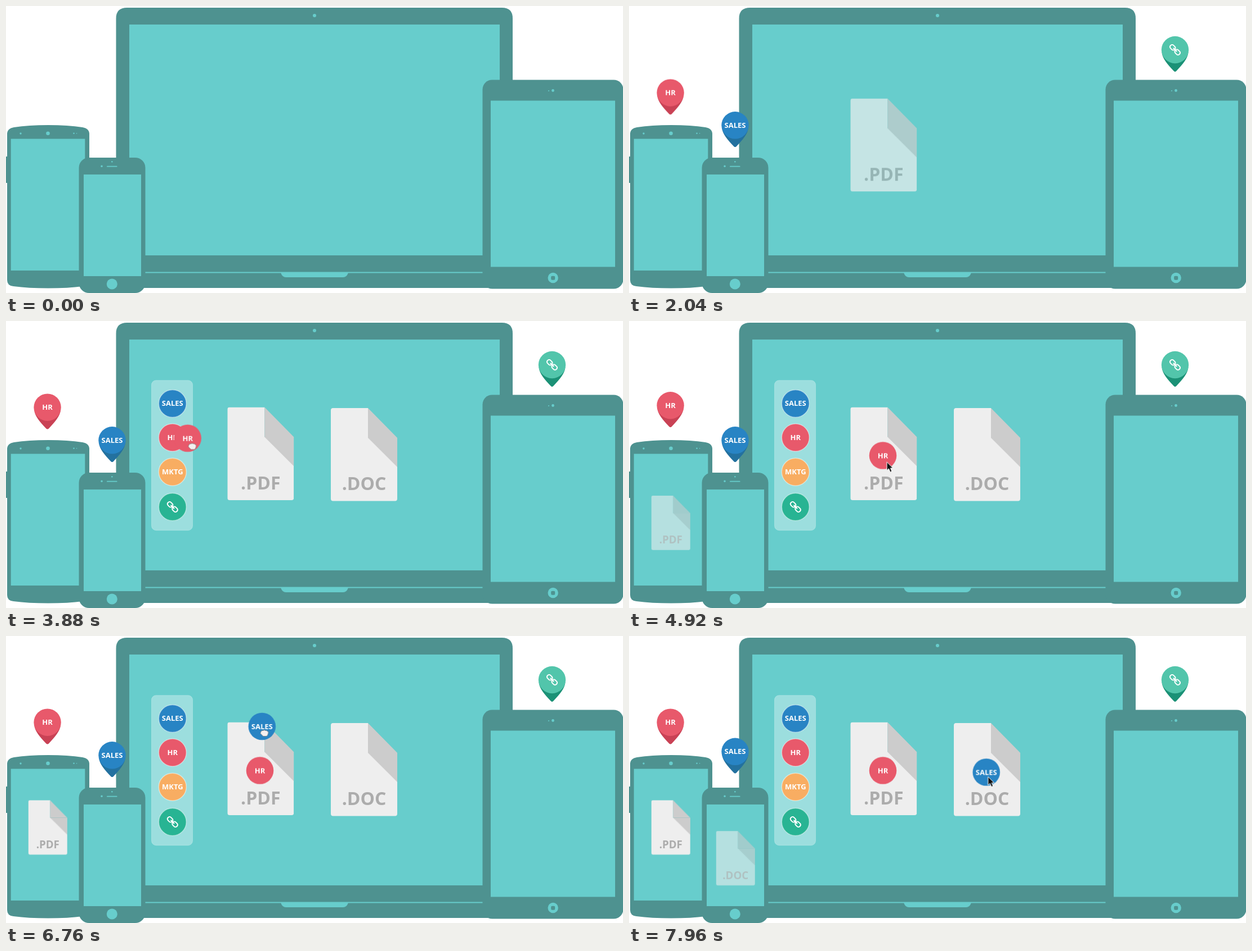
These frames come from a looping animation (1096x511 px, 8000 ms). An HTML page:

```html
<!DOCTYPE html>
<html lang="en">
<head>
<meta charset="utf-8">
<title>Sharing files to devices</title>
<style>
html, body { margin: 0; width: 100%; height: 100%; overflow: hidden; background: #fff; }
svg { display: block; width: 100vw; height: 100vh; }
text { font: bold 13px "Open Sans", sans-serif; fill: #fff; text-anchor: middle; }
.ext { font-size: 32px; fill: #acacac; }
.lit { fill: #67cdcc; }
.dark { fill: #4e9290; }
.ring circle { stroke: rgba(255,255,255,.45); stroke-width: 1.5; }

/* One shared 8 s clock: 1% = 80 ms */
.a { animation: 8s linear infinite; }

.pin-hr { animation-name: pin-hr; }
.pin-sales { animation-name: pin-sales; }
.pin-link { animation-name: pin-link; }
@keyframes pin-hr {
  0%, 2% { opacity: 0; transform: translateY(8px); }
  5% { opacity: 1; transform: translateY(-6px); }
  8% { transform: translateY(1.5px); }
  11%, 20% { transform: translateY(0); }
  25.5% { transform: translateY(.7px); }
  32.5% { transform: translateY(1.7px); }
  43%, 60.25% { transform: translateY(0); animation-timing-function: ease-in-out; }
  63% { transform: translateY(-8px); animation-timing-function: ease-in-out; }
  65.5%, 100% { opacity: 1; transform: translateY(0); }
}
@keyframes pin-sales {
  0%, 4.5% { opacity: 0; transform: translateY(8px); }
  7.5% { opacity: 1; transform: translateY(-6px); }
  10.5% { transform: translateY(1.5px); }
  13%, 97.5% { transform: translateY(0); }
  99.5% { transform: translateY(-6.5px); }
  100% { opacity: 1; transform: translateY(-7.5px); }
}
@keyframes pin-link {
  0%, 8% { opacity: 0; transform: translateY(8px); }
  11% { opacity: 1; transform: translateY(-6px); }
  14% { transform: translateY(1.5px); }
  17%, 100% { opacity: 1; transform: translateY(0); }
}

.pdf { animation-name: pdf; }
.doc { animation-name: doc; }
@keyframes pdf {
  0%, 20.75% { opacity: 0; transform: translateY(38px); }
  27.5%, 100% { opacity: 1; transform: translateY(0); }
}
@keyframes doc {
  0%, 26% { opacity: 0; transform: translateY(36px); }
  32% { opacity: 1; }
  33%, 100% { opacity: 1; transform: translateY(0); }
}

/* Phone files rise as a whole but fade piece by piece */
.rise1 { animation-name: rise1; }
.rise2 { animation-name: rise2; }
.fade1 > * { animation: fade1 8s linear infinite; }
.fade2 > * { animation: fade2 8s linear infinite; }
@keyframes rise1 {
  0%, 60% { transform: translateY(23.5px); }
  65% { transform: translateY(7px); animation-timing-function: ease-out; }
  68%, 100% { transform: translateY(0); }
}
@keyframes rise2 {
  0%, 97.5% { transform: translateY(23px); }
  100% { transform: translateY(17.4px); }
}
@keyframes fade1 {
  0%, 60% { opacity: 0; }
  61.5% { opacity: .58; }
  63.5%, 100% { opacity: 1; }
}
@keyframes fade2 {
  0%, 97.5% { opacity: 0; }
  99.5% { opacity: .58; }
  100% { opacity: .7; }
}

.panel { animation-name: panel; }
@keyframes panel {
  0%, 33.5% { opacity: 0; }
  42%, 100% { opacity: 1; }
}

/* Drags: x and y run on separate curves, giving a bent path */
.hr-x { animation-name: hr-x; }
.hr-y { animation-name: hr-y; }
.hr-soft { animation-name: hr-soft; }
.hr-hand { animation-name: hr-hand; }
.hr-arrow { animation-name: hr-arrow; }
.sales-x { animation-name: sales-x; }
.sales-y { animation-name: sales-y; }
.sales-soft { animation-name: sales-soft; }
.sales-hand { animation-name: sales-hand; }
.sales-arrow { animation-name: sales-arrow; }
@keyframes hr-x {
  0%, 45.5% { transform: translateX(-155px); animation-timing-function: cubic-bezier(.37,0,.63,1); }
  56.5%, 100% { transform: translateX(0); }
}
@keyframes hr-y {
  0% { visibility: hidden; transform: translateY(-32px); }
  45.4% { visibility: hidden; }
  45.5% { visibility: visible; transform: translateY(-32px); animation-timing-function: cubic-bezier(.9,0,.7,1); }
  56.5%, 100% { visibility: visible; transform: translateY(0); }
}
@keyframes hr-soft {
  0%, 56.4% { filter: blur(.7px); }
  56.5%, 100% { filter: none; }
}
@keyframes hr-hand {
  0%, 56.5% { opacity: 1; }
  56.51%, 100% { opacity: 0; }
}
@keyframes hr-arrow {
  0%, 56.5% { opacity: 0; transform: none; }
  56.51% { opacity: 1; }
  66% { transform: none; animation-timing-function: ease-in-out; }
  74%, 75.4% { opacity: 1; transform: translate(-158px,-93px); }
  75.5%, 100% { opacity: 0; transform: translate(-158px,-93px); }
}
@keyframes sales-x {
  0%, 75.5% { transform: translateX(-339px); animation-timing-function: cubic-bezier(.37,0,.63,1); }
  94.25%, 100% { transform: translateX(0); }
}
@keyframes sales-y {
  0% { visibility: hidden; transform: translateY(-95.5px); }
  75.4% { visibility: hidden; }
  75.5% { visibility: visible; transform: translateY(-95.5px); animation-timing-function: cubic-bezier(.9,0,.7,1); }
  94.25%, 100% { visibility: visible; transform: translateY(0); }
}
@keyframes sales-soft {
  0%, 94.2% { filter: blur(.7px); }
  94.25%, 100% { filter: none; }
}
@keyframes sales-hand {
  0%, 94.25% { opacity: 1; }
  94.26%, 100% { opacity: 0; }
}
@keyframes sales-arrow {
  0%, 94.25% { opacity: 0; }
  94.26%, 100% { opacity: 1; }
}
</style>
</head>
<body>
<svg viewBox="0 0 1096 511" preserveAspectRatio="none">
<defs>
  <path id="tail" d="M-23.4 5C-22.5 16-13 26-3 37Q0 41 3 37C13 26 22.5 16 23.4 5Z"/>
  <g id="link" transform="rotate(45)" fill="none" stroke="#fff" stroke-width="2">
    <rect x="-11" y="-3.7" width="10" height="7.4" rx="3.2"/>
    <rect x="1" y="-3.7" width="10" height="7.4" rx="3.2"/>
    <path d="M-4.5 0H4.5"/>
  </g>
  <path id="sheet" fill="#eee" d="M4 0H66V53H118V161.500Q118 165.500 114 165.500H4Q0 165.500 0 161.500V4Q0 0 4 0Z"/>
  <path id="fold" fill="#ccc" d="M66 0V53H118Z"/>
  <path id="shade" fill="#000" fill-opacity=".143" d="M66 53H118V105Z"/>
  <g id="paper"><use href="#sheet"/><path fill="#ccc" d="M66 0L118 53V105L66 53Z"/></g>
  <path id="arrow" fill="#111" stroke="#fff" stroke-width="1" stroke-linejoin="round" d="M0 0V15L3.500 12L6 18L9 16.800L6.500 11H11Z"/>
  <path id="hand" fill="#f4f0f0" stroke="#777" stroke-width=".8" d="M-6-2Q-4-5-2-4Q0-6 2-4Q4-5 5-3Q8-3 7 1Q6 5 4 6H-2Q-5 3-7 1Z"/>
</defs>

<!-- laptop -->
<path class="dark" d="M195.500 502V22Q195.500 3 215 3H881Q900 3 900 22V502Z"/>
<path class="lit" d="M219 33H877V444H219ZM247 473.500H847V475.500H247ZM488 475H608Q605 483 599 483H497Q491 483 488 475Z"/>
<circle class="lit" cx="548" cy="17" r="3"/>

<!-- tablet -->
<rect class="dark" x="846.500" y="131.500" width="250" height="372" rx="17"/>
<rect class="lit" x="861" y="168.500" width="221" height="296"/>
<g class="lit">
  <circle cx="971.500" cy="150.500" r="2.400"/>
  <circle cx="964" cy="151" r="1"/>
  <circle cx="971.700" cy="484" r="9.200"/>
</g>
<rect class="dark" x="968.200" y="480.700" width="7" height="7" rx="1.800"/>

<!-- large phone -->
<path class="dark" d="M2 228Q2 218 14 216Q40 212 75 212Q110 212 136 216Q148 218 148 228V488Q148 498 137 499Q110 502.500 75 502.500Q40 502.500 13 499Q2 498 2 488Z"/>
<rect class="dark" x="0" y="268" width="3" height="47"/>
<rect class="lit" x="8.700" y="236.500" width="131.600" height="234.500"/>
<g class="lit">
  <circle cx="74.500" cy="226.700" r="3.300"/>
  <circle cx="26" cy="227" r="1.700"/>
  <circle cx="120.500" cy="226.700" r="1.300"/>
  <circle cx="125.500" cy="226.700" r=".8"/>
</g>

<!-- small phone -->
<rect class="dark" x="129.500" y="270" width="118" height="241" rx="18"/>
<g class="lit">
  <rect x="138" y="300" width="102" height="181"/>
  <rect x="179" y="284.800" width="18.500" height="1.800" rx=".9"/>
  <circle cx="188.300" cy="277.300" r="1.300"/>
  <circle cx="170" cy="285.300" r="1.700"/>
  <circle cx="188.300" cy="495" r="9.500"/>
</g>

<!-- pins -->
<g transform="translate(73.600 153.700)"><g class="a pin-hr">
  <use href="#tail" fill="#c94255"/><circle r="24.200" fill="#e8596b"/><text y="4.700">HR</text>
</g></g>
<g transform="translate(188.500 212.300)"><g class="a pin-sales">
  <use href="#tail" fill="#23719f"/><circle r="24.200" fill="#2884c4"/><text y="4.700">SALES</text>
</g></g>
<g transform="translate(970 78)"><g class="a pin-link">
  <use href="#tail" fill="#1b9176"/><circle r="24.200" fill="#52c5ab"/><use href="#link"/>
</g></g>

<!-- laptop files -->
<g transform="translate(393.300 153.500)"><g class="a pdf">
  <use href="#paper"/><text class="ext" x="59" y="146.300">.PDF</text>
</g></g>
<g transform="translate(577 155)"><g class="a doc">
  <use href="#paper"/><text class="ext" x="59" y="146.300">.DOC</text>
</g></g>

<!-- phone files -->
<g class="a rise1"><g class="fade1" transform="translate(39.800 292.500) scale(.584)">
  <use href="#sheet"/><use href="#fold"/><use href="#shade"/><text class="ext" x="59" y="146.300">.PDF</text>
</g></g>
<g class="a rise2"><g class="fade2" transform="translate(154.800 328.800) scale(.584)">
  <use href="#sheet"/><use href="#fold"/><use href="#shade"/><text class="ext" x="59" y="146.300">.DOC</text>
</g></g>

<!-- tag panel -->
<g class="a panel">
  <rect x="258.500" y="105.700" width="73" height="267" rx="8" fill="#fff" fill-opacity=".35" stroke="#fff" stroke-opacity=".25"/>
  <g class="ring">
    <g transform="translate(295.800 147)"><circle r="24.500" fill="#2884c4"/><text y="4.300">SALES</text></g>
    <g transform="translate(295.800 207.500)"><circle r="24.500" fill="#e8596b"/><text y="4.300">HR</text></g>
    <g transform="translate(295.800 268.700)"><circle r="24.500" fill="#f8ad62"/><text y="4.300">MKTG</text></g>
    <g transform="translate(295.800 331)"><circle r="24.500" fill="#28b493"/><use href="#link"/></g>
  </g>
</g>

<!-- dragged tags -->
<g transform="translate(451 239.500)">
  <g class="a hr-x"><g class="a hr-y">
    <g class="a hr-soft"><circle r="24.300" fill="#e8596b"/><text y="4.500">HR</text></g>
    <g class="a hr-hand"><use href="#hand" x="8" y="14"/></g>
  </g></g>
  <g class="a hr-arrow"><use href="#arrow" x="7" y="11.500"/></g>
</g>
<g transform="translate(634.700 242.500)">
  <g class="a sales-x"><g class="a sales-y">
    <g class="a sales-soft"><circle r="24.300" fill="#2884c4"/><text y="4.500">SALES</text></g>
    <g class="a sales-hand"><use href="#hand" x="4" y="11.500"/></g>
  </g></g>
  <g class="a sales-arrow"><use href="#arrow" x="3" y="8"/></g>
</g>
</svg>
</body>
</html>
```
